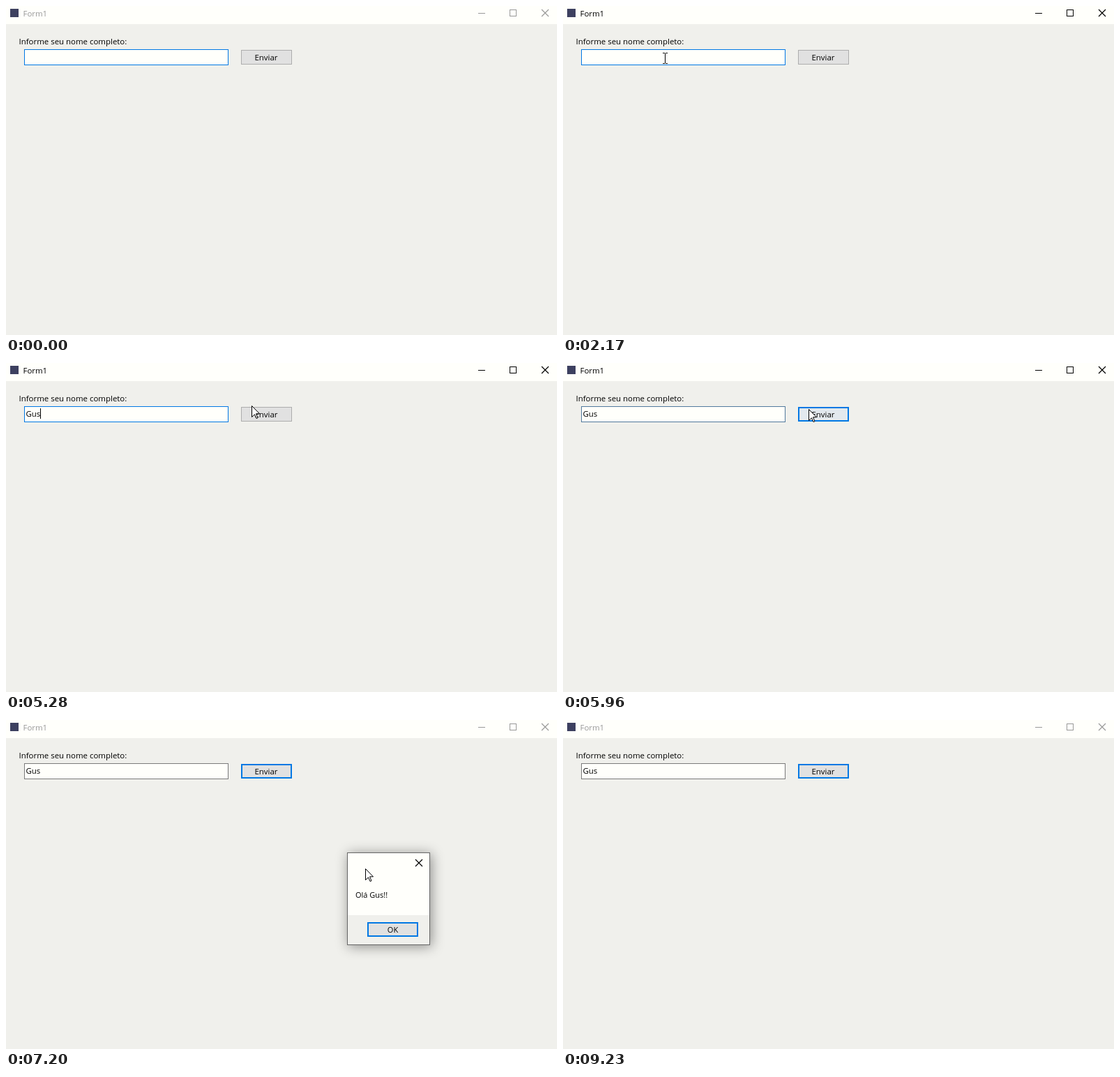
Animation of 790x472 px, one loop 9.3 s. Source, as an HTML page:

```html
<!DOCTYPE html>
<html lang="pt">
<head>
<meta charset="utf-8">
<title>Form1</title>
<style>
  html, body { margin: 0; width: 100%; height: 100%; overflow: hidden; background: #f0f0ec; }
  svg { display: block; width: 790px; height: 472px; }
  text { font: 11.45px "Open Sans", "Noto Sans", sans-serif; fill: #000; white-space: pre; }
  .small { font-size: 11px; }
  .glyph { fill: none; stroke-width: 1; }
  .cross { stroke-width: 1.2; }
  .crisp { shape-rendering: crispEdges; }
  #frame { filter: drop-shadow(2px 2px 9px rgba(0, 0, 0, .42)); }
</style>
</head>
<body>
<svg viewBox="0 0 790 472">
  <rect width="790" height="472" fill="#f0f0ec"/>
  <rect width="790" height="26" fill="#fffffb"/>
  <rect x="6" y="4" width="12" height="12" fill="#3d4060"/>
  <text id="title" x="24.5" y="15">Form1</text>
  <g id="controls" class="glyph">
    <path class="crisp" d="M677 10.5h10M722.5 5.5h9v9h-9z"/>
    <path class="cross" d="M768 5l10 10M778 5l-10 10"/>
  </g>

  <text x="18.5" y="55">Informe seu nome completo:</text>
  <rect id="input" class="crisp" x="26.5" y="62.5" width="292" height="22" fill="#fffffb"/>
  <text id="typed" x="28.5" y="77"></text>
  <rect id="caret" class="crisp" y="65" width="1" height="15"/>
  <rect id="send"/>
  <text x="373" y="78" text-anchor="middle">Enviar</text>

  <g id="dialog">
    <rect id="frame" x="489" y="190" width="119" height="133" fill="#fffffb"/>
    <rect x="490" y="280" width="117" height="42" fill="#f0f0ec"/>
    <rect x="489.5" y="190.5" width="118" height="132" fill="none" stroke="#666"/>
    <path id="close" class="glyph cross" stroke="#000" d="M587 200l10 10M597 200l-10 10"/>
    <text class="small" x="501" y="255">Olá Gus!!</text>
    <rect id="ok"/>
    <text class="small" x="554.5" y="305" text-anchor="middle">OK</text>
  </g>

  <path id="arrow" fill="#fff" stroke="#000" stroke-linejoin="round"
        d="M.5 .5V16.5L4.5 12.8 7 18.5 9 17.7 6.6 11.8H11.5Z"/>
  <path id="beam" class="glyph crisp" stroke="#000" d="M-3 -7.5h3m1 0h3M.5 -7V7M-3 7.5h3m1 0h3"/>
</svg>
<script>
const LOOP = 9300, TICK = 68, BLINK = 540;
const NAME = 'Gus';
const KEYS = [2570, 3040, 3710];

const BLUE = [0, 120, 228], NAVY = [0, 84, 153];
const GREY = [122, 122, 122], DARK = [23, 23, 23];
const FACE = [225, 225, 225], EDGE = [173, 173, 173];
const LIGHT = [229, 241, 251], SUNK = [204, 228, 247];

// Pointer moves: start, end, then a quadratic curve
const MOVES = [
  [470, 1300, [605, 441], [170, 150], [146, 75]],
  [4050, 4880, [146, 75], [290, -50], [352, 49]],
  [5060, 5280, [352, 49], [352, 55], [352, 61]],
  [5550, 5620, [352, 61], [352, 64], [352, 66]],
  [6590, 7490, [352, 66], [500, 130], [555, 306]],
  [8410, 8900, [555, 306], [640, 390], [725, 474]]
];

const $ = id => document.getElementById(id);
const set = (id, attrs) => {
  for (const k in attrs) $(id).setAttribute(k, attrs[k]);
};
const show = (id, on) => set(id, { visibility: on ? 'visible' : 'hidden' });
const between = (t, a, b) => t >= a && t < b;
const mix = (a, b, p) => a.map((v, i) => v + (b[i] - v) * p);
const rgb = c => `rgb(${c.map(Math.round)})`;
const smooth = p => p * p * (3 - 2 * p);

// Rises from 0 to 1 in even ticks; the first falls on start, the last on end
function ramp(t, start, end) {
  const gaps = Math.round((end - start) / TICK);
  const done = Math.floor((t - start) / (end - start) * gaps + .01) + 1;
  return Math.max(0, Math.min(1, done / (gaps + 1)));
}

function pointer(t) {
  const [start, end, a, b, c] = MOVES.filter(m => m[0] <= t).pop() || MOVES[0];
  const p = smooth(ramp(t, start, end));
  return mix(mix(a, b, p), mix(b, c, p), p).map(Math.round);
}

function button(id, x, y, hover, pressed, focused) {
  const w = focused && !pressed && hover < 1 ? 2 : 1;
  const fill = pressed ? SUNK : mix(FACE, LIGHT, hover);
  const stroke = pressed ? NAVY : mix(focused ? BLUE : EDGE, BLUE, hover);
  set(id, {
    x: x + w / 2, y: y + w / 2, width: 73 - w, height: 21 - w,
    fill: rgb(fill), stroke: rgb(stroke), 'stroke-width': w
  });
}

function drawInput(t) {
  let edge = mix(BLUE, GREY, ramp(t, 70, 210));
  edge = mix(edge, DARK, ramp(t, 1230, 1440));
  edge = mix(edge, BLUE, ramp(t, 1440, 1670));
  edge = mix(edge, GREY, ramp(t, 5870, 6000));
  set('input', { stroke: rgb(edge) });

  $('typed').textContent = NAME.slice(0, KEYS.filter(k => k <= t).length);
  set('caret', { x: Math.round(28.5 + $('typed').getComputedTextLength()) });
  const since = t - Math.max(...[1600, ...KEYS, 5280].filter(k => k <= t));
  show('caret', between(t, 1600, 5870) && Math.floor(since / BLINK) % 2 === 0);
}

function drawDialog(t) {
  const opening = ramp(t, 6000, 6250), closing = ramp(t, 7940, 8150);
  const shown = opening * (1 - closing);
  const scale = .95 + .05 * opening - .05 * closing;
  set('dialog', { opacity: shown, transform: `translate(528 236) scale(${scale}) translate(-528 -236)` });
  set('close', { opacity: Math.max(0, 1 - 2 * closing) });
  button('ok', 518, 290, ramp(t, 7490, 7570), between(t, 7880, 7940), true);
}

function drawPointer(t) {
  const [x, y] = pointer(t);
  const visible = between(t, 470, 2570) || between(t, 4050, 8900);
  const overInput = between(x, 26, 319) && between(y, 62, 85);
  for (const id of ['arrow', 'beam']) {
    set(id, { transform: `translate(${x} ${y})` });
    show(id, visible && overInput === (id === 'beam'));
  }
}

function draw(t) {
  const active = between(t, 1440, 6000) || between(t, 8010, 9230);
  const ink = active ? '#000' : '#999';
  $('title').style.fill = ink;
  set('controls', { stroke: ink });
  const hover = ramp(t, 5550, 5620) - ramp(t, 5930, 6000);
  button('send', 337, 63, hover, between(t, 5870, 5930), t >= 5870);
  drawInput(t);
  drawDialog(t);
  drawPointer(t);
}

const origin = performance.now();
function tick() {
  draw((performance.now() - origin) % LOOP);
  requestAnimationFrame(tick);
}
tick();
</script>
</body>
</html>
```
